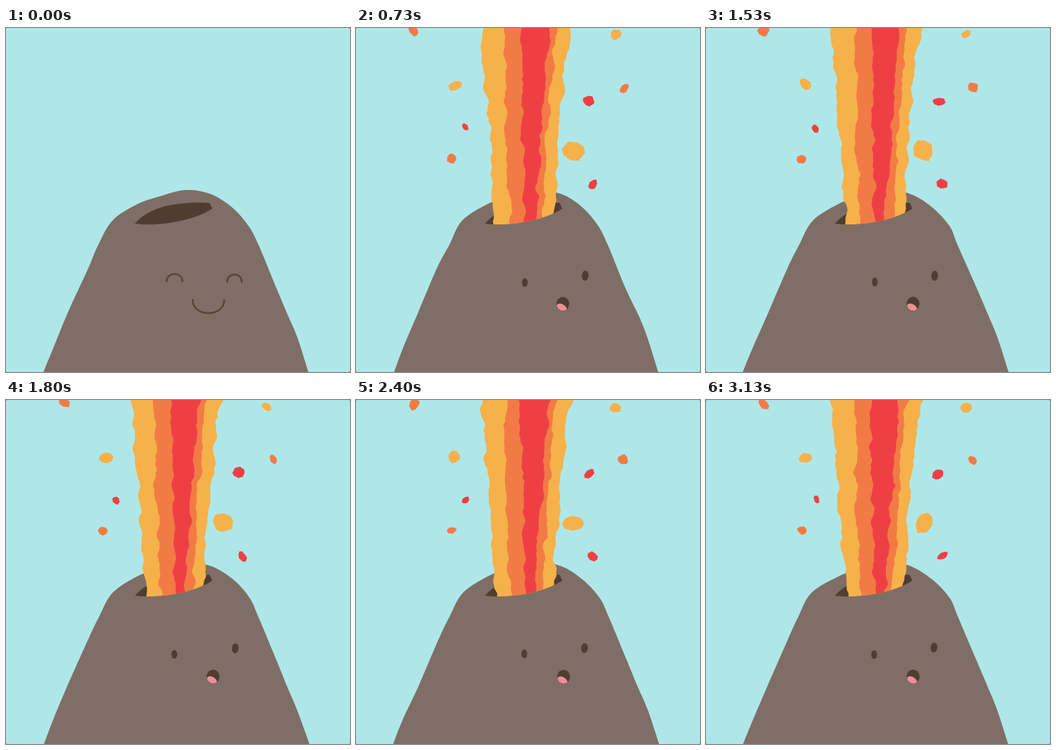
Recreate the animation shown at these times as an HTML page with a canvas. Size 480 by 480 pixels, loop 3.19 s.

```html
<!DOCTYPE html>
<html lang="en">
<head>
<meta charset="utf-8">
<title>Volcano</title>
<style>
  html, body { margin: 0; width: 100%; height: 100%; overflow: hidden; background: #6f8486; }
  canvas { display: block; width: 480px; height: 480px; border-radius: 2px; }
</style>
</head>
<body>
<canvas id="stage" width="480" height="480"></canvas>
<script>
const ctx = document.getElementById('stage').getContext('2d');
const SKY = '#afe7e9', ROCK = '#7f6e65', DARK = '#4e3d31', LINE = '#594539';
const YELLOW = '#f6b14a', ORANGE = '#f27b45', RED = '#ee4044', PINK = '#ee8e99';

// 15 drawings a second: calm first, then erupting.
const LOOP = 3190, DRAWINGS = 48, ERUPT = 9;
const startOf = n => Math.round(n * 20 / 3) * 10;

// Right-hand outline of the lava bands: x at the top, x at the lip, bend.
const bands = [
  { color: YELLOW, left: [175, 195, 1], right: [275, 302, 1.5] },
  { color: ORANGE, left: [208, 215, 2], right: [260, 281, 1.4] },
  { color: RED, left: [230, 235, 1], right: [250, 269, 1] }
];
bands.forEach(b => { b.right = [b.right[1], b.right[0], 1 / b.right[2]]; });

const rocks = [
  { color: ORANGE, x: 81, y: 4, size: 9 },
  { color: YELLOW, x: 138, y: 80, size: 10 },
  { color: RED, x: 153, y: 139, size: 6 },
  { color: ORANGE, x: 134, y: 183, size: 7 },
  { color: YELLOW, x: 363, y: 10, size: 8 },
  { color: ORANGE, x: 373, y: 83, size: 7.5 },
  { color: RED, x: 325, y: 103, size: 8.5 },
  { color: YELLOW, x: 304, y: 171, size: 15 },
  { color: RED, x: 330, y: 218, size: 8 }
];

const slope = [
  [52, 481], [66, 446], [87, 398], [114, 335], [129, 303], [148, 269], [184, 246],
  [215, 235], [250, 226.5], [285, 231.5], [316, 250], [339, 276], [352, 303],
  [377, 363], [393, 400], [406, 432], [423, 481]
];

// Repeatable noise from -1 to 1.
function noise(a, b) {
  const s = Math.sin(a * 127.1 + b * 311.7 + 17.3) * 43758.5453;
  return (s - Math.floor(s)) * 2 - 1;
}

// The same noise, blended smoothly between whole steps of p.
function smoothNoise(seed, p) {
  const i = Math.floor(p), f = p - i, s = f * f * (3 - 2 * f);
  return noise(seed, i) * (1 - s) + noise(seed, i + 1) * s;
}

function fill(color) {
  ctx.fillStyle = color;
  ctx.fill();
}

function ellipse(x, y, rx, ry, turn, color) {
  ctx.beginPath();
  ctx.ellipse(x, y, rx, ry, turn, 0, Math.PI * 2);
  fill(color);
}

// Smooth curve that passes through every point.
function curve(pts) {
  const at = i => pts[Math.min(pts.length - 1, Math.max(0, i))];
  ctx.beginPath();
  ctx.moveTo(...pts[0]);
  for (let i = 0; i < pts.length - 1; i++) {
    const [a, b, c, d] = [at(i - 1), at(i), at(i + 1), at(i + 2)];
    ctx.bezierCurveTo(b[0] + (c[0] - a[0]) / 6, b[1] + (c[1] - a[1]) / 6,
      c[0] - (d[0] - b[0]) / 6, c[1] - (d[1] - b[1]) / 6, c[0], c[1]);
  }
}

function drawSlope(n) {
  curve(slope.map(([x, y], i) => [x + 1.1 * noise(n, i), y + 0.4 * noise(n, i + 50)]));
  fill(ROCK);
}

// Front rim of the crater, from right to left.
function rim() {
  ctx.lineTo(288, 252);
  ctx.quadraticCurveTo(268, 265, 236, 270.5);
  ctx.quadraticCurveTo(205, 276.5, 180, 273);
}

function drawHole() {
  ctx.beginPath();
  ctx.moveTo(180, 273);
  ctx.quadraticCurveTo(194, 256, 224, 248);
  ctx.quadraticCurveTo(255, 242, 284, 244);
  rim();
  fill(DARK);
}

function edge([top, end, bend], seed) {
  const pts = [];
  for (let y = -4; y <= 280; y += 3) {
    const p = Math.max(0, y / 270);
    // A right edge has bend < 1 and falls fast first.
    const x = top + (end - top) * p ** bend;
    pts.push([x + 3.2 * smoothNoise(seed, y / 17) + 1.3 * smoothNoise(seed + 0.5, y / 6), y]);
  }
  return pts;
}

function drawLava(n) {
  ctx.save();
  ctx.beginPath();
  ctx.moveTo(0, 0);
  ctx.lineTo(480, 0);
  ctx.lineTo(480, 252);
  rim();
  ctx.lineTo(0, 273);
  ctx.clip();
  bands.forEach(({ color, left, right }, i) => {
    const seed = n * 10 + i * 2;
    ctx.beginPath();
    for (const p of [...edge(left, seed), ...edge(right, seed + 1).reverse()]) ctx.lineTo(...p);
    fill(color);
  });
  ctx.restore();
}

function drawRock({ color, x, y, size }, seed) {
  const corners = 8;
  ctx.save();
  ctx.translate(x + 1.5 * noise(seed, 1), y + 1.5 * noise(seed, 2));
  ctx.rotate(1.2 * noise(seed, 3));
  ctx.scale(size, size * (0.8 + 0.2 * noise(seed, 4)));
  ctx.beginPath();
  for (let i = 0; i < corners; i++) {
    const a = (i + 0.25 * noise(seed, i + 10)) / corners * Math.PI * 2;
    const r = 1 + 0.12 * noise(seed, i + 20);
    ctx.lineTo(r * Math.cos(a), r * Math.sin(a));
  }
  fill(color);
  ctx.restore();
}

function drawShock(n) {
  const j = k => noise(n, k + 80);
  ellipse(235 + j(1), 355 + j(2), 4, 6.2, 0, DARK);
  ellipse(319 + j(3), 346 + j(4), 4.7, 7, 0.08, DARK);
  const x = 289 + j(5), y = 385.5 + j(6);
  ellipse(x, y, 9, 9.7, 0, DARK);
  ctx.save();
  ctx.clip();
  ellipse(x - 1.5, y + 5, 7.5, 4.5, 0.5, PINK);
  ctx.restore();
}

function arc(x, y, width, bend) {
  ctx.beginPath();
  ctx.moveTo(x, y);
  ctx.bezierCurveTo(x, y + bend, x + width, y + bend, x + width, y);
  ctx.stroke();
}

function drawSmile(n) {
  const j = k => 0.6 * noise(n, k + 80);
  ctx.strokeStyle = LINE;
  ctx.lineWidth = 2.5;
  ctx.lineCap = 'round';
  arc(224.5 + j(1), 354 + j(2), 22, -13.5);
  arc(309 + j(3), 354 + j(4), 20.5, -13.5);
  arc(261 + j(5), 380 + j(6), 44, 24.5);
}

function draw(n) {
  ctx.fillStyle = SKY;
  ctx.fillRect(0, 0, 480, 480);
  drawSlope(n);
  drawHole();
  if (n < ERUPT) return drawSmile(n);
  drawLava(n);
  rocks.forEach((r, i) => drawRock(r, n * 12 + i));
  drawShock(n);
}

const begin = performance.now();
let shown = -1;
function tick() {
  const t = (performance.now() - begin) % LOOP;
  let n = DRAWINGS - 1;
  while (startOf(n) > t) n--;
  if (n !== shown) draw(shown = n);
  requestAnimationFrame(tick);
}
tick();
</script>
</body>
</html>
```
